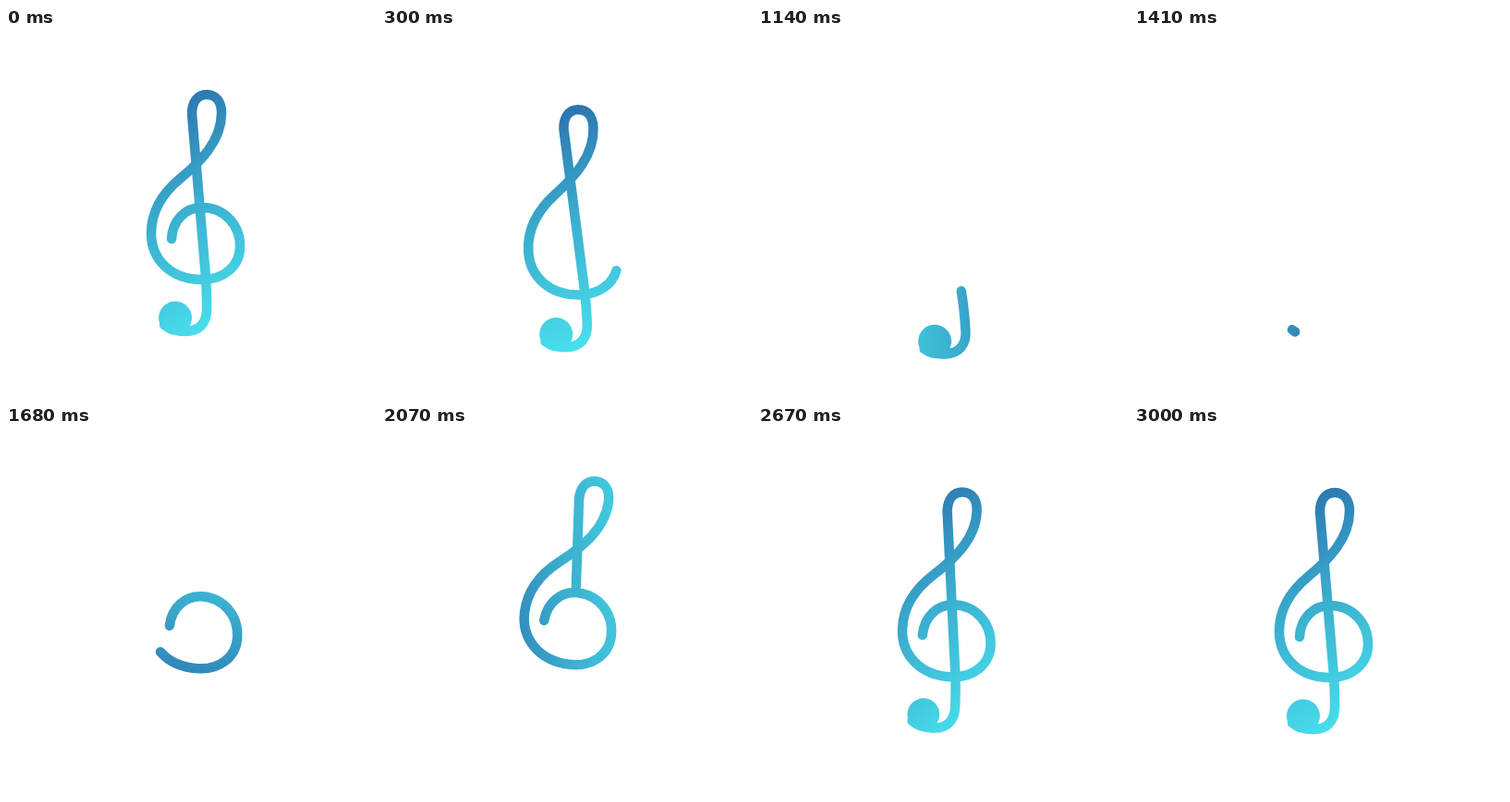
An HTML page for the animation above (5030 ms loop, 400 px wide and 400 px high).

```html
<!DOCTYPE html>
<html lang="en">
<head>
<meta charset="utf-8">
<title>Treble clef</title>
<style>
  html, body { margin: 0; width: 100%; height: 100%; overflow: hidden; background: #fff; }
  svg { display: block; width: 100%; height: 100%; }
</style>
</head>
<body>
<svg viewBox="0 0 400 400">
  <linearGradient id="blue" gradientUnits="userSpaceOnUse" x1="-133" x2="133" y1="0" y2="0">
    <stop offset="0" stop-color="#2a6dab"/>
    <stop offset=".5" stop-color="#3bafcf"/>
    <stop offset="1" stop-color="#48e0ed"/>
  </linearGradient>
  <g id="clef">
    <path id="line" pathLength="1" fill="none" stroke="url(#blue)" stroke-width="10.5" stroke-linecap="round"
      d="M179 228C180 208 194 194 212 194C236 194 253 213 253 236C253 257 236 272 212 272
         C178 272 157 250 157 222C157 198 170 178 188 163C210 145 233 122 233 92
         C233 80 227 72 217 72C207 72 201 80 201 93L216 270C217 284 217 292 217 304
         C217 320 208 328 194 328C184 328 176 325 171 321"/>
    <circle id="ball" cx="183" cy="313.500" r="18" fill="url(#blue)"/>
  </g>
</svg>
<script>
const LOOP = 5030, ACTIVE = 3000, STEP = 30, ERASED = 1470;
const [gradient, clef, line, ball] = ['blue', 'clef', 'line', 'ball'].map(id => document.getElementById(id));

const progress = (t, start, end) => Math.min(1, Math.max(0, (t - start) / (end - start)));
const easeInOut = u => (1 - Math.cos(Math.PI * u)) / 2;
const easeOut = u => Math.sin(Math.PI * u / 2);

function render() {
  const t = Math.min(ACTIVE, Math.floor(performance.now() % LOOP / STEP) * STEP);
  const ease = (start, end) => easeInOut(progress(t, start, end));

  // Swing out, past the middle, and back to rest
  const drop = 41.5 * ease(0, 680) - 57.5 * ease(680, 1930) + 16 * ease(1930, 2825);
  const tilt = 6.8 * (ease(0, 720) - 2 * ease(720, 2100) + ease(2100, ACTIVE));

  // The line is erased in two overlapping strokes, then drawn again in one
  const erasing = t < ERASED;
  const from = erasing ? (ease(0, 750) + ease(540, ERASED)) / 2 : 0;
  const to = erasing ? 1 : easeOut(progress(t, ERASED, 2560));

  line.setAttribute('stroke-dasharray', `${to - from} 2`);
  line.setAttribute('stroke-dashoffset', -from);
  line.style.display = to - from > .001 ? '' : 'none';
  ball.setAttribute('r', 18 * (1 - ease(1290, 1400) + ease(2450, 2700)));
  clef.setAttribute('transform', `translate(0 ${drop}) rotate(${-tilt} 200 195)`);
  gradient.setAttribute('gradientTransform',
    `translate(200 195) scale(.8 1) rotate(${65 + 360 * ease(0, ACTIVE)})`);
  requestAnimationFrame(render);
}
render();
</script>
</body>
</html>
```
